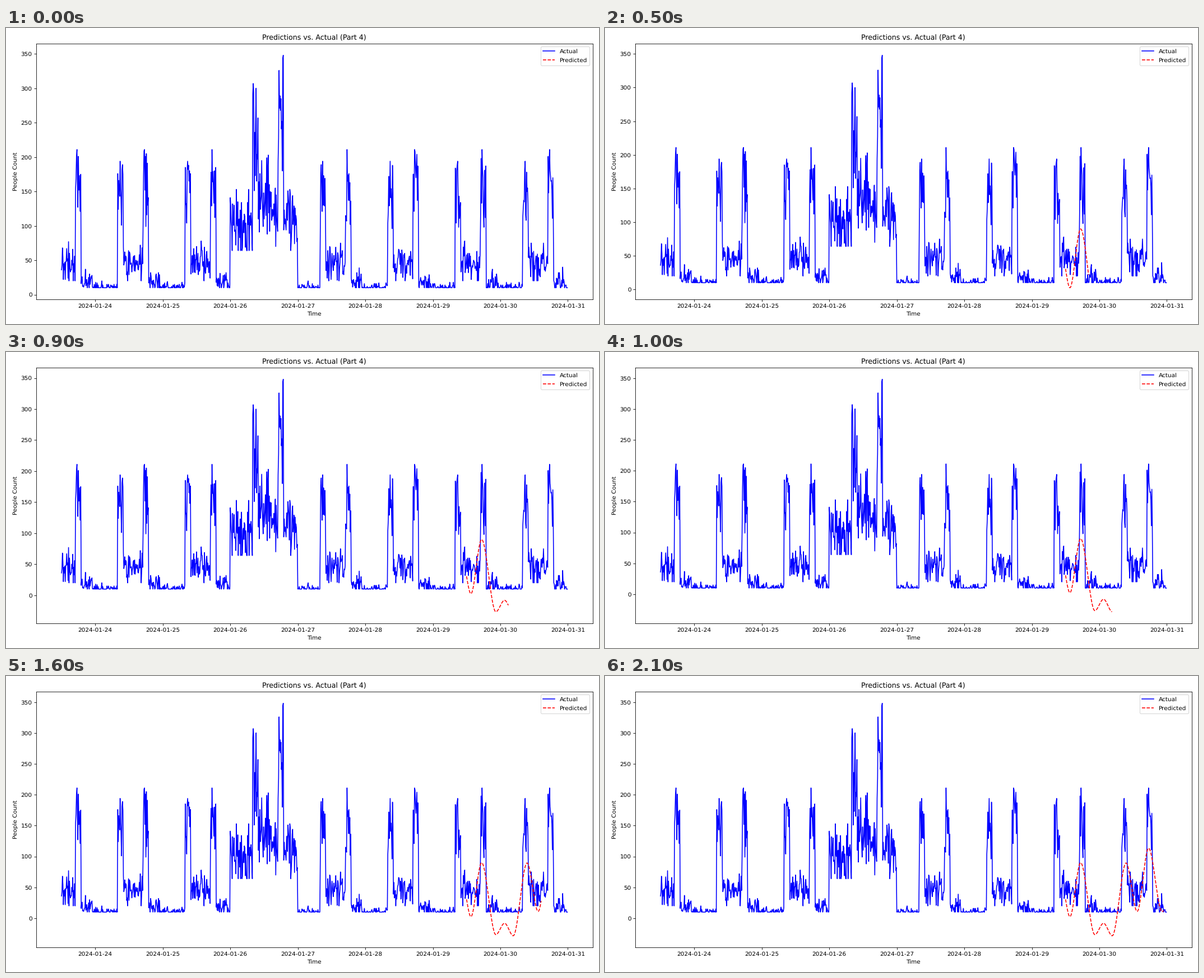
These frames come from a looping animation (1058 px wide and 529 px high, 2200 ms). A matplotlib script:

```python
import matplotlib.pyplot as plt
import numpy as np
from matplotlib.animation import FuncAnimation

WIDTH, HEIGHT = 1058, 529
DPI = WIDTH / 14
FRAMES, INTERVAL = 22, 100
POINTS_PER_FRAME = 10
PER_HOUR, PER_DAY = 6, 144
COUNT = 1080
EVENT_DAY = 3

# Rush start hour -> (sample of the peak, peak count)
RUSH = {8: (5, 194), 17: (3, 211)}
EVENT_RUSH = {8: (1, 307), 17: (11, 348)}

# Forecast turning points: hours since its start, people
TURNS = [(-1.6, 60), (1.55, 2.5), (5.35, 90), (10.4, -26.6), (13.5, -8),
         (16.6, -28.4), (21.5, 89.5), (25.45, 11), (29.5, 113.5),
         (34.3, 10.5), (37.5, 40)]

plt.rcParams["text.hinting"] = "none"


def level(day, hour):
    """Mean, spread, lowest and highest count outside the rush hours."""
    if day == EVENT_DAY:
        return (143, 34, 70, 203) if 10 <= hour < 17 else (110, 28, 64, 153)
    if 10 <= hour < 17:
        return 45, 14, 20, 78
    if 19 <= hour < 23:
        return 18, 9, 10, 40
    return 10, 4, 10, 21


def make_actual():
    rng = np.random.default_rng(4)
    slots = np.arange(COUNT) + PER_DAY // 2
    counts = np.empty(COUNT)
    for i, (day, slot) in enumerate(zip(*divmod(slots, PER_DAY))):
        hour = slot // PER_HOUR
        rushes = EVENT_RUSH if day == EVENT_DAY else RUSH
        start = next((h for h in rushes if h <= hour < h + 2), None)
        if start is None:
            mean, spread, low, high = level(day, hour)
            counts[i] = np.clip(rng.normal(mean, spread), low, high)
        else:
            peak_at, peak = rushes[start]
            at_peak = slot - start * PER_HOUR == peak_at
            counts[i] = peak if at_peak else peak * rng.uniform(0.46, 0.99)
    return counts.round()


def ease_between(turns, x):
    """Smooth curve that is level at every turning point."""
    tx, ty = np.array(turns).T
    i = np.searchsorted(tx, x, side="right") - 1
    u = (x - tx[i]) / (tx[i + 1] - tx[i])
    return ty[i] + (ty[i + 1] - ty[i]) * u * u * (3 - 2 * u)


times = np.datetime64("2024-01-23T12:00") + np.arange(COUNT) * np.timedelta64(10, "m")
actual = make_actual()
forecast_times = times[6 * PER_DAY:]
forecast = ease_between(TURNS, np.arange(len(forecast_times)) / PER_HOUR)

fig, ax = plt.subplots(figsize=(14, 7), dpi=DPI)
fig.subplots_adjust(left=53.9 / WIDTH, right=1046.7 / WIDTH,
                    bottom=1 - 485 / HEIGHT, top=1 - 28 / HEIGHT)
ax.plot(times, actual, color="blue", label="Actual")
predicted, = ax.plot(forecast_times[:0], forecast[:0], color="red",
                     linestyle="--", label="Predicted")
ax.set_title("Predictions vs. Actual (Part 4)")
ax.set_xlabel("Time")
ax.set_ylabel("People Count")
ax.legend(loc="upper right", labelspacing=0.54)


def update(frame):
    shown = frame * POINTS_PER_FRAME
    predicted.set_data(forecast_times[:shown], forecast[:shown])
    values = np.append(actual, forecast[:shown])
    margin = 0.05 * np.ptp(values)
    ax.set_ylim(values.min() - margin, values.max() + margin)
    return predicted,


animation = FuncAnimation(fig, update, frames=FRAMES, interval=INTERVAL,
                          repeat=True, repeat_delay=0, blit=False)
plt.show()
```
